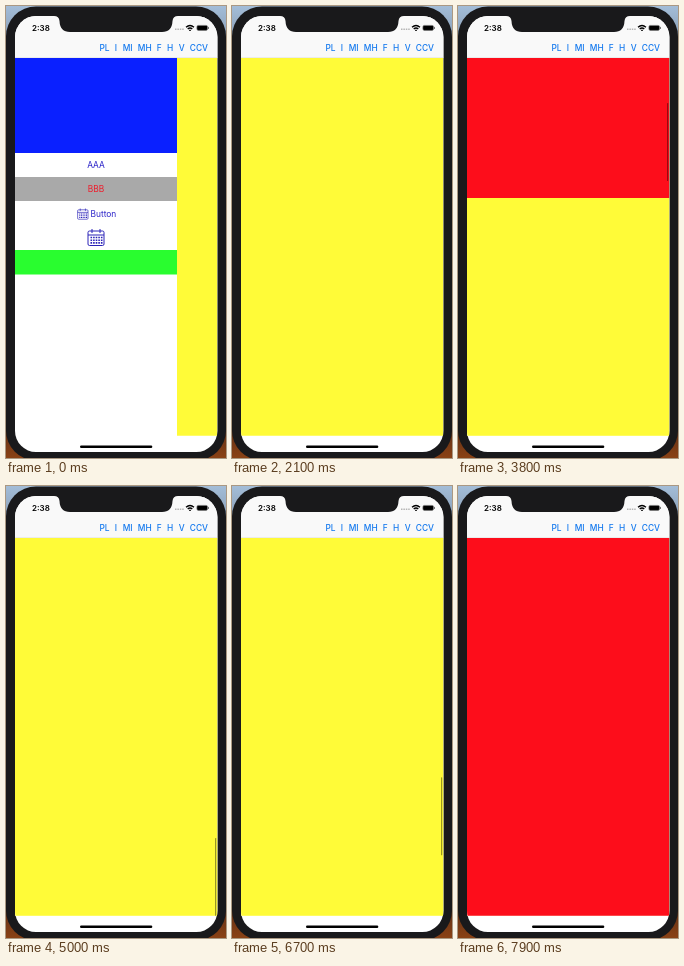
These frames come from a looping animation (220x452 px, 8000 ms). An HTML page:

```html
<!DOCTYPE html>
<html lang="en">
<head>
<meta charset="utf-8">
<title>Scrolling stacks</title>
<style>
html, body { margin: 0; width: 100%; height: 100%; overflow: hidden; }
svg { display: block; width: 220px; height: 452px; }
text { font-family: Inter, Roboto, sans-serif; font-size: 8.4px; }
</style>
</head>
<body>
<svg viewBox="0 0 220 452">
  <defs>
    <linearGradient id="desk" x2="0" y2="1">
      <stop offset="0" stop-color="#a3bdd8"/>
      <stop offset=".1" stop-color="#8193aa"/>
      <stop offset=".5" stop-color="#30343c"/>
      <stop offset=".9" stop-color="#4a2614"/>
      <stop offset="1" stop-color="#8a4216"/>
    </linearGradient>
    <clipPath id="screen"><rect x="9" y="10" width="202.4" height="436" rx="21"/></clipPath>
    <clipPath id="view"><rect x="9" y="52" width="202.4" height="377.7"/></clipPath>
    <g id="calendar" fill="none" stroke="#2a22b8">
      <rect x=".5" y="2" width="16" height="14.5" rx="1.5"/>
      <path d="M.5 6H16.5M4.5 0V4M12.5 0V4"/>
      <path d="M3 8.5H15M3 11.2H15M3 13.9H15" stroke-width="1.6" stroke-dasharray="1.6 1"/>
    </g>
  </defs>

  <rect width="220" height="452" fill="url(#desk)"/>
  <rect y=".5" width="220" height="454" rx="30" fill="#19191b"/>

  <g clip-path="url(#screen)">
    <rect x="9" y="10" width="203" height="437" fill="#fff"/>
    <rect x="9" y="10" width="203" height="42" fill="#f9f9f9"/>
    <path d="M9 51.8H212" stroke="#d0d0d2" stroke-width=".5"/>
    <g id="nav" fill="#1479ee" font-weight="500"></g>
    <text x="26" y="24.8" font-weight="600" style="font-size:8px">2:38</text>
    <path d="M169 23.3H178" stroke="#b5b5b5" stroke-width="1.4" stroke-dasharray="1.5 .9"/>
    <g fill="none" stroke="#000" stroke-width="1.3">
      <path d="M180 21.3Q184 17.7 188 21.3M181.7 23Q184 21 186.3 23"/>
      <path d="M183.2 24.3H184.8"/>
    </g>
    <rect x="190.9" y="19.4" width="10.6" height="5" rx="1.4" fill="#000" stroke="#777" stroke-width=".6"/>
    <path d="M202.5 20.9V23" stroke="#777"/>

    <g clip-path="url(#view)">
      <g id="row">
        <rect x="9" y="52" width="162" height="95" fill="#0a20ff"/>
        <rect x="9" y="171" width="162" height="24" fill="#a9a9a9"/>
        <rect x="9" y="244" width="162" height="24.5" fill="#29fd2f"/>
        <g fill="#2a22c8">
          <text x="90" y="162" text-anchor="middle">AAA</text>
          <text x="90" y="186" text-anchor="middle" fill="#f01828">BBB</text>
          <text x="84.5" y="211">Button</text>
        </g>
        <use href="#calendar" transform="translate(71.3 202.5) scale(.65)"/>
        <use href="#calendar" transform="translate(81.5 223)"/>
        <rect x="171" y="52" width="420" height="378" fill="#fffb38"/>
      </g>
      <g id="column">
        <rect x="9" y="52" width="203" height="378" fill="#fff"/>
        <g id="pages">
          <rect x="9" y="52" width="203" height="378" fill="#fd0d1b"/>
          <rect x="9" y="430" width="203" height="1700" fill="#fffb38"/>
        </g>
        <rect id="bar" x="209" width="1.2" rx=".6" fill="#000"/>
      </g>
    </g>
    <rect x="74" y="439.6" width="72.3" height="2.4" rx="1.2" fill="#000"/>
  </g>
  <path d="M48 9V10Q53 10 53.5 15Q54 26 64 26H156Q166 26 166.5 15Q167 10 172 10V9Z" fill="#19191b"/>
</svg>
<script>
const LOOP = 8000, SWITCH = 2300;
const $ = id => document.getElementById(id);
const smooth = p => p * p * (3 - 2 * p);
const glide = p => 1 - (1 - p) ** 2;
const linear = p => p;

// Keys are [time, value, easing towards this key].
function track(keys, t) {
  const i = keys.findIndex(k => k[0] > t);
  if (i < 0) return keys[keys.length - 1][1];
  if (!i) return keys[0][1];
  const [t0, a] = keys[i - 1], [t1, b, ease = smooth] = keys[i];
  return a + (b - a) * ease((t - t0) / (t1 - t0));
}

const across = [[100, 0], [1100, 161], [1300, 170]];
const down = [[2500, -1], [2700, -1], [2900, 0], [3800, 238],
  [4700, 1683], [6400, 1683], [7300, 363], [7700, 0, glide]];
const fade = [[2400, 0], [2550, .4, linear], [5000, .4], [5600, 0, linear],
  [6500, 0], [6650, .4, linear], [7600, .4], [7850, 0, linear]];

const labels = { PL: 93.4, I: 108.8, MI: 116.7, MH: 131.8, F: 150.8, H: 161, V: 172.7, CCV: 183.8 };
$("nav").innerHTML = Object.entries(labels)
  .map(([s, x]) => `<text x="${x}" y="44.8">${s}</text>`).join("");

function draw(now) {
  const t = now % LOOP;
  const y = track(down, t);
  $("row").setAttribute("transform", `translate(${-track(across, t)} 0)`);
  $("column").style.display = t < SWITCH ? "none" : "";
  $("pages").setAttribute("transform", `translate(0 ${-y})`);
  $("bar").setAttribute("y", 55 + Math.max(0, y) * 297 / 1683);
  $("bar").setAttribute("height", y < 0 ? 73 : 78);
  $("bar").setAttribute("opacity", track(fade, t));
}

const start = performance.now();
function tick() {
  draw(performance.now() - start);
  requestAnimationFrame(tick);
}
tick();
</script>
</body>
</html>
```
